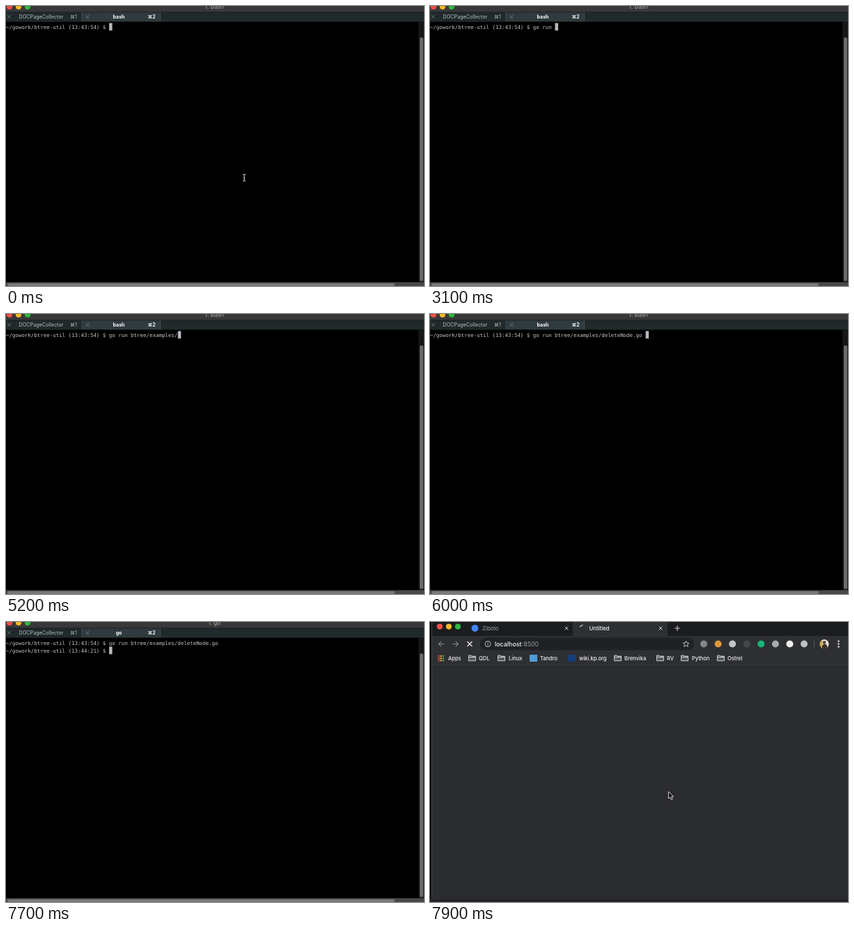
These frames come from a looping animation (600x402 px, 8 s). An HTML page with a canvas:

```html
<!DOCTYPE html>
<html lang="en">
<head>
<meta charset="utf-8">
<title>Terminal to browser</title>
<style>
html, body { margin: 0; width: 100%; height: 100%; overflow: hidden; background: #000; }
canvas { display: block; width: 600px; height: 402px; }
</style>
</head>
<body>
<canvas id="stage" width="600" height="402"></canvas>
<script>
const g = document.getElementById('stage').getContext('2d');
const LOOP = 8000, CELL = 4.486;
const UI = 'Inter, "DejaVu Sans", sans-serif';
const MONO = '7.45px "DejaVu Sans Mono", monospace';
const COMMAND = 'go run btree/examples/deleteNode.go ';
const PAGE = '#2b2c2f', BAR = '#2d2f32';

// [time, characters visible]; the jumps are tab completions
const TYPING = [[800, 1], [1000, 2], [1200, 3], [1500, 4], [1900, 5], [2100, 6], [2300, 7],
  [3300, 8], [3500, 9], [3800, 13], [4200, 14], [4400, 15], [4900, 22], [5500, 23], [5800, 36]];
const ENTER = 6900, RUNNING = 7300, PROMPT = 7600, BROWSER = 7800, NEW_TAB = 7900;

function rect(x, y, w, h, color, r = 0) {
  g.fillStyle = color;
  g.beginPath();
  g.roundRect(x, y, w, h, r);
  g.fill();
}

function dot(x, y, r, color) {
  g.fillStyle = color;
  g.beginPath();
  g.arc(x, y, r, 0, 7);
  g.fill();
}

function text(s, x, y, size, color, align = 'left', weight = 400) {
  g.font = `${weight} ${size}px ${UI}`;
  g.textAlign = align;
  g.fillStyle = color;
  g.fillText(s, x, y);
}

function stroke(d, color, width = 1) {
  g.strokeStyle = color;
  g.lineWidth = width;
  g.stroke(new Path2D(d));
}

function cross(x, y, r, color, width = 1) {
  stroke(`M${x - r} ${y - r}l${2 * r} ${2 * r}m0 ${-2 * r}l${-2 * r} ${2 * r}`, color, width);
}

function plus(x, y, r, color) {
  stroke(`M${x - r} ${y}h${2 * r}M${x} ${y - r}v${2 * r}`, color, 1.1);
}

function lights(x, y, r) {
  ['#fb4f47', '#f8b828', '#2fb93f'].forEach((c, i) => dot(x + i * 13, y, r, c));
}

function line(s, row) {
  g.font = MONO;
  g.textAlign = 'left';
  g.fillStyle = '#c3c3c3';
  g.fillText(s, 0, 32.6 + row * 11);
}

function terminal(t) {
  const job = t < RUNNING ? 'bash' : 'go';
  rect(0, 0, 600, 402, '#000');
  rect(0, 0, 600, 9, '#38383a');
  text('1. ' + job, 299, 4, 8.2, '#b0b0b0', 'center');
  lights(5, 1, 4);

  rect(0, 9, 600, 14, '#20292c');
  rect(109, 9, 112, 13.5, '#303b3f');
  rect(0, 8.5, 600, .7, '#14191b');
  rect(108.5, 9, .8, 14, '#4a5558');
  rect(221, 9, .8, 14, '#4a5558');
  rect(0, 22.3, 600, .7, '#10181b');
  cross(4.5, 15.5, 2.4, '#7c8587', .8);
  cross(117, 15.5, 2.4, '#7c8587', .8);
  text('DOCPageCollector', 50.5, 18, 7.2, '#b9bfc0', 'center');
  text('⌘1', 97, 18, 7, '#b9bfc0', 'center');
  text(job, 162, 18, 7, '#fff', 'center', 700);
  text('⌘2', 209, 18, 7, '#fff', 'center', 700);

  rect(592, 23, 8, 374, '#171717');
  rect(594, 45, 5, 350, '#6b6b6b', 2.5);
  rect(0, 396.5, 600, 5.5, '#484848');
  rect(2, 398, 556, 4, '#787878', 2);

  const prompt = '~/gowork/btree-util (13:43:54) $ ';
  const typed = TYPING.reduce((n, [at, count]) => t >= at ? count : n, 0);
  const entered = t >= ENTER, done = t >= PROMPT;
  line(prompt + COMMAND.slice(0, typed), 0);
  if (done) line(prompt.replace('43:54', '44:21'), 1);
  const column = entered ? (done ? prompt.length : 0) : prompt.length + typed;
  rect(column * CELL, entered ? 35.5 : 24.5, CELL, 10.7, '#b8b8bd');

  if (t < TYPING[0][0]) {
    stroke('M340 241.5q2 0 2 1.5q0 -1.5 2 -1.5M342 243v7M340 251.5q2 0 2 -1.5q0 1.5 2 1.5M341 247h2', '#d8d8d8');
  }
}

function folder(x) {
  rect(x + .5, 48, 10, 7.7, '#55585b', 1);
  stroke(`M${x + .5} 48h3.7l1 1.3h5.3v6.4h-10zM${x + .5} 50.6h10`, '#cbcdd0');
}

function bookmarks() {
  const colors = ['#ea4b3c', '#f0a030', '#45a85a', '#4585e8'];
  for (let i = 0; i < 9; i++) {
    const row = Math.floor(i / 3);
    rect(11.5 + i % 3 * 3.2, 47.8 + row * 3.2, 2.2, 2.2, colors[(i + row) % 4]);
  }
  [55, 97, 264, 325, 360, 412].forEach(folder);
  rect(143, 47, 11, 10, '#4f9bdc');
  rect(198, 47, 11, 10, '#153f7c');
  const labels = [['Apps', 26], ['QDL', 70], ['Linux', 113], ['Tandro', 158], ['wiki.kp.org', 214],
    ['Brenvika', 279], ['RV', 340], ['Python', 376], ['Ostrel', 427]];
  for (const [s, x] of labels) text(s, x, 54.6, 7.5, '#f0f1f2', 'left', 500);
}

function toolbar(loading) {
  rect(3, 20, 597, 42, BAR);
  rect(3, 61, 597, .8, '#36383b');
  stroke('M20.5 31.5h-8m3.7 -3.7l-3.7 3.7l3.7 3.7', '#85888b', 1.1);
  stroke('M32.5 31.5h8m-3.7 -3.7l3.7 3.7l-3.7 3.7', '#85888b', 1.1);
  cross(57, 31.5, 3.5, loading ? '#f1f1f1' : '#8c8f92', 1.2);

  rect(72, 22.5, 307, 18, '#1f2124', 9);
  stroke('M79 31.5a4 4 0 1 0 8 0a4 4 0 1 0 -8 0M83 31v2.5M83 29v1', '#d0d2d4', .9);
  text('localhost', 93, 34.6, 8.9, '#f3f4f4', 'left', 500);
  const host = g.measureText('localhost').width;
  text(':8500', 93 + host, 34.6, 8.9, '#9a9ea1');
  stroke('M367.5 27.2l1.3 2.8l3 .3l-2.3 2l.7 3l-2.7 -1.6l-2.7 1.6l.7 -3l-2.3 -2l3 -.3z', '#d0d2d4', .9);

  ['#85888a', '#dd9a3c', '#c4c5c6', '#42474a', '#18b778', '#a9abac', '#eeeeee', '#bfc0c1']
    .forEach((c, i) => dot(393 + i * 20.57, 31.5, 5, c));
  rect(551, 26, .8, 11, '#5a5d60');

  // Profile picture
  g.save();
  g.beginPath();
  g.arc(566, 31.5, 6.5, 0, 7);
  g.clip();
  rect(559, 25, 14, 13, '#e6e2d8');
  rect(559, 25, 4, 13, '#d3a443');
  rect(563, 32, 7, 7, '#35312e', 3);
  dot(566, 29.5, 2.4, '#54443a');
  g.restore();
  [27.5, 31.5, 35.5].forEach(y => dot(586.5, y, 1.2, '#e2e3e4'));
  bookmarks();
}

function browser(t) {
  const open = t >= NEW_TAB;
  rect(0, 0, 600, 402, PAGE);
  rect(0, 0, 2, 402, '#050505');
  rect(2, 0, 1, 402, '#46484a');
  rect(3, 0, 597, 20, open ? '#1b1c1e' : '#363b3e');
  lights(14, 6.6, 4.1);
  dot(64.5, 9, 5, '#4285f4');
  text('Zibolo', 75, 11.7, 8, '#a3a6a8');
  cross(196, 9, 2.4, '#c6c8ca');
  if (open) {
    rect(205, 0, 136, 21, BAR);
    stroke('M215.5 7.2q1 -2.6 4 -2.7', '#e4e5e6', 1.2);
    text('Untitled', 228.5, 11.7, 7.8, '#f3f4f4', 'left', 500);
    cross(331, 9, 2.4, '#d6d7d8');
    plus(355, 9, 3.8, '#c6c8ca');
  } else {
    cross(206, 9, 1.2, '#c6c8ca');
    plus(220, 9, 3.8, '#c6c8ca');
  }
  toolbar(open);
  rect(0, 398, 600, 4, '#242528');

  const arrow = new Path2D('M342.4 243.5v10l2.3 -2.1l1.6 3.6l1.8 -.8l-1.6 -3.5h3z');
  g.fillStyle = '#0b0b0b';
  g.fill(arrow);
  g.strokeStyle = '#e8e8e8';
  g.lineWidth = .9;
  g.stroke(arrow);
}

const start = performance.now();
function frame() {
  const t = (performance.now() - start) % LOOP;
  (t < BROWSER ? terminal : browser)(t);
  requestAnimationFrame(frame);
}
frame();
</script>
</body>
</html>
```
